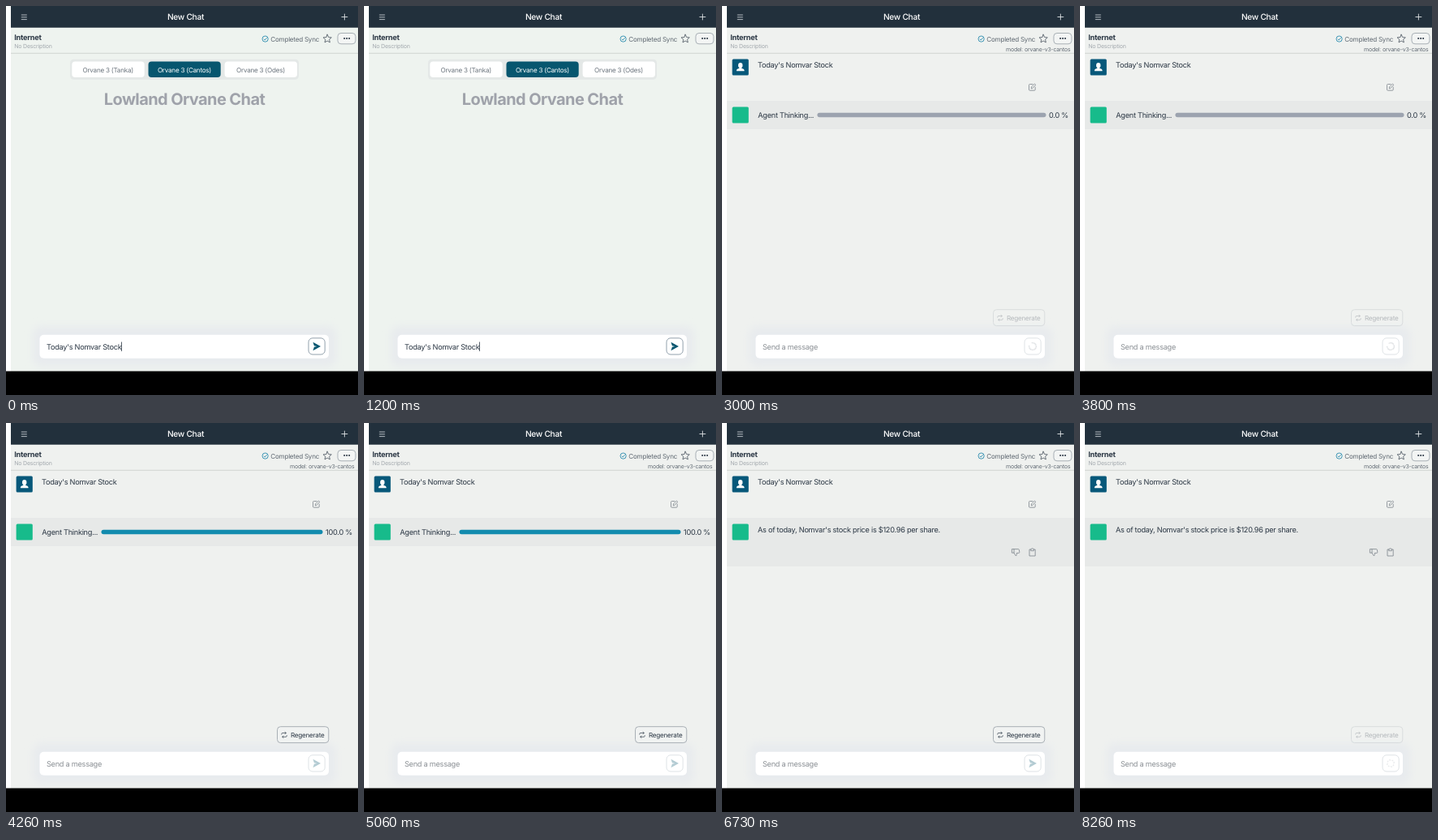
Animation, 434 px wide and 480 px high, one loop 8.33 s. Source, as an HTML page:

```html
<!DOCTYPE html>
<html lang="en">
<head>
<meta charset="utf-8">
<title>New Chat</title>
<style>
  html, body { margin: 0; width: 100%; height: 100%; overflow: hidden; background: #fff; }
  svg { display: block; width: 434px; height: 480px; }
  text {
    font: 9.2px Inter, "Liberation Sans", sans-serif;
    letter-spacing: -.03em;
    fill: #2b3744;
    white-space: pre;
    text-rendering: geometricPrecision;
  }
  .small { font-size: 8.1px; }
  .tiny { font-size: 7px; }
  .mid { text-anchor: middle; }
  .end { text-anchor: end; }
  .line { fill: none; stroke: #7d858c; stroke-width: .8; stroke-linecap: round; stroke-linejoin: round; }
  .off { opacity: .3; }

  /* Scene switches: every state is a hard cut on one shared clock. */
  .start, .caret, .chat, .waiting, .done, .working, .answer, .busy, .idle, .late, .agent, .row, .settle {
    animation: 8.33s step-end infinite;
  }
  .start   { animation-name: start; }
  .caret   { animation-name: caret; }
  .chat    { animation-name: chat; }
  .waiting { animation-name: waiting; }
  .done    { animation-name: done; }
  .working { animation-name: working; }
  .answer  { animation-name: answer; }
  .busy    { animation-name: busy; }
  .idle    { animation-name: idle; }
  .late    { animation-name: late; }
  .agent   { animation-name: agent; }
  .row     { animation-name: row; }
  .settle  { animation-name: settle; }
  .spin    { animation: spin .833s linear infinite; transform-origin: 383px 420px; }

  @keyframes start   { 0% { visibility: visible } 17.2%, 100% { visibility: hidden } }
  @keyframes caret   { 0%, 12% { opacity: 1 } 6% { opacity: 0 } }
  @keyframes chat    { 0% { visibility: hidden } 17.2%, 100% { visibility: visible } }
  @keyframes waiting { 0%, 46.8%, 100% { visibility: hidden } 17.2% { visibility: visible } }
  @keyframes done    { 0%, 77.2%, 100% { visibility: hidden } 46.8% { visibility: visible } }
  @keyframes working { 0%, 77.2%, 100% { visibility: hidden } 17.2% { visibility: visible } }
  @keyframes answer  { 0% { visibility: hidden } 77.2%, 100% { visibility: visible } }
  @keyframes busy    { 0%, 46.8% { visibility: hidden } 17.2%, 88.8%, 100% { visibility: visible } }
  @keyframes idle    { 0%, 88.8%, 100% { visibility: hidden } 46.8% { visibility: visible } }
  @keyframes late    { 0% { visibility: hidden } 88.8%, 100% { visibility: visible } }
  @keyframes agent   { 0% { visibility: hidden } 25.6%, 100% { visibility: visible } }
  @keyframes row     { 0% { height: 28.5px } 25.6% { height: 35px } 77.2%, 100% { height: 60px } }
  @keyframes settle  { 0% { transform: translateY(-3.5px) } 25.6%, 100% { transform: none } }
  @keyframes spin    { from { transform: rotate(96deg) } to { transform: rotate(456deg) } }
</style>
</head>
<body>
<svg viewBox="0 0 434 480">
  <defs>
    <filter id="soft" x="-10%" y="-60%" width="120%" height="220%">
      <feGaussianBlur stdDeviation="5"/>
    </filter>
    <path id="plane" d="M378.5 414.8 L388 420 L378.5 425.2 L379.9 420.7 L383.4 420 L379.9 419.3 Z"/>
    <g id="redo">
      <rect x="334.5" y="374.7" width="63.3" height="19.9" rx="4" fill="#f1f3f2" stroke="#a0a8ae" stroke-width=".9"/>
      <path class="line" style="stroke:#4a5560" d="M339.8 384.2 V383.6 Q339.8 382.5 341 382.5 H345.2 M344 381.3 L345.3 382.5 L344 383.7 M346.2 385.6 V386.2 Q346.2 387.3 345 387.3 H340.8 M342 386.1 L340.7 387.3 L342 388.5"/>
      <text class="small" x="351" y="387.8">Regenerate</text>
    </g>
    <rect id="key" x="373" y="409.8" width="20.2" height="20.2" rx="5" fill="#fff" stroke="#8797a3" stroke-width=".9"/>
  </defs>

  <rect width="434" height="480" fill="#fff"/>
  <rect x="6" width="428" height="451" fill="#eff1ef"/>
  <rect class="start" x="6" width="428" height="451" fill="#eef3ef"/>
  <rect x="6" width="428" height="26.7" fill="#22303c"/>

  <!-- Top bar -->
  <path d="M18.8 11 H25.8 M18.8 13.8 H25.8 M18.8 16.6 H25.8" stroke="#c3c9ce" stroke-width=".9"/>
  <path d="M413.5 13.5 H421.3 M417.4 9.6 V17.4" stroke="#dfe2e5" stroke-width=".9"/>
  <text class="mid" x="221.5" y="17.3" style="font-size:10.2px;font-weight:500;fill:#fff">New Chat</text>

  <!-- Bot bar -->
  <path d="M6 58.3 H434" stroke="#cdd2d0" stroke-width=".9"/>
  <text x="10.3" y="41.5" style="font-weight:700">Internet</text>
  <text class="tiny" x="10.3" y="51.6" style="fill:#a2a8ad">No Description</text>
  <g fill="none" stroke="#2a8cae" stroke-width=".9">
    <circle cx="319.6" cy="40.6" r="3.6"/>
    <path d="M317.8 40.7 L319.2 42 L321.6 39.3"/>
  </g>
  <text class="small" x="326.3" y="43.5" style="fill:#626b74">Completed Sync</text>
  <path class="line" style="stroke:#4a545f" d="M396.2 35.2 L397.7 38.5 L401.3 38.9 L398.6 41.3 L399.4 44.9 L396.2 43.1 L393 44.9 L393.8 41.3 L391.1 38.9 L394.7 38.5 Z"/>
  <rect x="409" y="33.5" width="22" height="13.3" rx="4" fill="#f3f5f4" stroke="#a0a8ae" stroke-width=".9"/>
  <g fill="#232f3e"><circle cx="417.2" cy="40.1" r="1"/><circle cx="420.2" cy="40.1" r="1"/><circle cx="423.2" cy="40.1" r="1"/></g>

  <!-- Message box -->
  <rect x="33" y="395" width="374" height="50" rx="10" fill="#e8ebee" filter="url(#soft)"/>
  <rect x="41.5" y="405.7" width="356.5" height="29" rx="5" fill="#fff"/>
  <rect y="450.6" width="434" height="29.4"/>

  <!-- Empty chat with a typed prompt -->
  <g class="start">
    <rect x="79" y="65.8" width="282" height="25" rx="4.5" fill="#e4e8e7"/>
    <rect x="81.3" y="68.5" width="89.4" height="19.6" rx="4" fill="#fff"/>
    <rect x="175.5" y="68.5" width="89.2" height="19.6" rx="4" fill="#07566f"/>
    <rect x="269.6" y="68.5" width="89.4" height="19.6" rx="4" fill="#fff"/>
    <text class="small mid" x="125.7" y="81.5" style="fill:#6c757e">Orvane 3 (Tanka)</text>
    <text class="small mid" x="220" y="81.5" style="fill:#fff">Orvane 3 (Cantos)</text>
    <text class="small mid" x="314" y="81.5" style="fill:#6c757e">Orvane 3 (Odes)</text>
    <text class="mid" x="220" y="122.3" style="font-size:20px;font-weight:700;fill:#9fa2aa">Lowland Orvane Chat</text>
    <text x="50" y="423.6">Today's Nomvar Stock</text>
    <rect class="caret" x="142" y="414.5" width=".8" height="11.5" fill="#2b3744"/>
    <use href="#key"/>
    <use href="#plane" fill="#07566f"/>
  </g>

  <!-- Conversation -->
  <g class="chat">
    <text class="tiny end" x="429.5" y="56" style="fill:#626b74">model: orvane-v3-cantos</text>
    <rect x="12.6" y="65.5" width="20.2" height="20" rx="1.5" fill="#07587a"/>
    <ellipse cx="22.7" cy="73.2" rx="2.7" ry="3.2" fill="#fff"/>
    <path d="M17.9 80.2 V79 Q18.2 77.5 21.3 76.8 V74.5 H24.1 V76.8 Q27.2 77.5 27.5 79 V80.2 Z" fill="#fff"/>
    <text x="44" y="75.6">Today's Nomvar Stock</text>
    <path class="line" d="M383 96.5 H379.5 Q378.5 96.5 378.5 97.5 V103.2 Q378.5 104.2 379.5 104.2 H385.2 Q386.2 104.2 386.2 103.2 V100.2 M381.3 101.5 L381.6 99.8 L385.4 96 L386.9 97.4 L383 101.2 Z"/>
    <rect class="row" x="6" y="117" width="428" height="35" fill="#e7e9e8"/>
  </g>
  <rect class="agent" x="12.6" y="124.4" width="20.2" height="20" rx="1.5" fill="#17bb8b"/>

  <g class="settle">
    <text class="working" x="44.3" y="137.9">Agent Thinking...</text>
    <g class="waiting">
      <rect x="117.5" y="131.7" width="282" height="5.6" rx="2.8" fill="#9ca3af"/>
      <text class="end" x="427" y="137.9">0.0 %</text>
    </g>
    <g class="done">
      <rect x="117.5" y="131.7" width="273" height="5.6" rx="2.8" fill="#138bae"/>
      <text class="end" x="427" y="137.9">100.0 %</text>
    </g>
  </g>

  <g class="answer">
    <text x="44" y="135.4">As of today, Nomvar's stock price is $120.96 per share.</text>
    <path class="line" d="M357.8 155.6 H360 V160.2 H357.8 Z M360 155.6 H365.3 Q366.3 155.6 366.4 156.5 L366.8 159.4 Q366.8 160.5 365.8 160.5 H363.4 V162.4 Q363.4 163.7 362 163.7 L360 160.2"/>
    <path class="line" d="M381 156 H379 V164 H386.2 V156 H384.2 M380.8 157.3 V156.2 Q381 154.8 382.6 154.8 Q384.2 154.8 384.4 156.2 V157.3 Z"/>
  </g>

  <!-- Footer controls -->
  <text class="chat" x="50" y="423.6" style="fill:#8b9095">Send a message</text>
  <g class="idle">
    <use href="#redo"/>
    <g class="off"><use href="#key"/><use href="#plane" fill="#07566f"/></g>
  </g>
  <g class="busy">
    <g class="off">
      <use href="#redo"/>
      <use href="#key"/>
      <g class="spin" fill="none" stroke="#5f6c79" stroke-width="1">
        <path class="waiting" d="M385 416.1 A4.4 4.4 0 1 1 381 416.1"/>
        <circle class="late" cx="383" cy="420" r="4.2" pathLength="16" stroke-dasharray="1 1"/>
      </g>
    </g>
  </g>
</svg>
</body>
</html>
```
